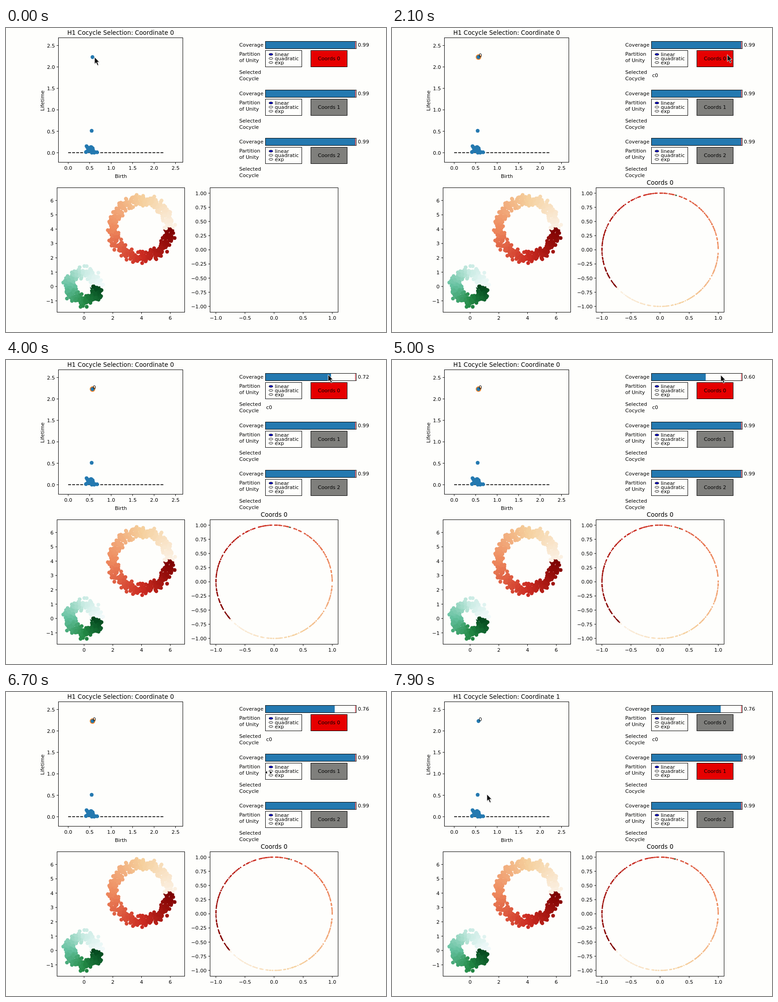
An HTML page for the animation above (8000 ms loop, 837x669 px).

```html
<!DOCTYPE html>
<html lang="en">
<head>
<meta charset="utf-8">
<title>Cocycle selection</title>
<style>
html, body { margin: 0; width: 100%; height: 100%; overflow: hidden; background: #fefefc; }
svg { display: block; width: 837px; height: 669px; }
text { font: 11.11px "DejaVu Sans", sans-serif; fill: #000; }
.title { font-size: 13.33px; }
.line { fill: none; stroke: #000; stroke-width: 1; }
</style>
</head>
<body>
<svg id="stage" viewBox="0 0 837 669"></svg>
<script>
const LOOP = 8000, FRAME = 100;
const BLUE = '#2479b0', PAPER = '#fefefc', RED = '#e60000', GREY = '#7f7f7c';
const TURN = 2 * Math.PI;
const stage = document.getElementById('stage');

function add(tag, attrs, parent = stage) {
  const el = document.createElementNS('http://www.w3.org/2000/svg', tag);
  for (const k in attrs) el.setAttribute(k, attrs[k]);
  parent.appendChild(el);
  return el;
}
function label(s, x, y, anchor = 'start', extra = {}) {
  const el = add('text', { x, y, 'text-anchor': anchor, ...extra });
  el.textContent = s;
  return el;
}
const dot = (cx, cy, r, fill, parent) => add('circle', { cx, cy, r, fill }, parent);
const box = (x, y, width, height, extra) => add('rect', { x, y, width, height, ...extra });
const show = (el, on) => el.setAttribute('visibility', on ? 'visible' : 'hidden');
const clamp = (v, lo, hi) => Math.max(lo, Math.min(hi, v));

// Seeded random numbers
let seed = 20;
function rand() {
  seed = (seed + 0x6D2B79F5) | 0;
  let n = Math.imul(seed ^ (seed >>> 15), 1 | seed);
  n = (n + Math.imul(n ^ (n >>> 7), 61 | n)) ^ n;
  return ((n ^ (n >>> 14)) >>> 0) / 4294967296;
}
const gauss = () => Math.sqrt(-2 * Math.log(1 - rand())) * Math.cos(TURN * rand());

// Colour ramps, light to dark
const WARM = ['fbf2e6', 'f5cf9c', 'ee8a5e', 'cc2c22', '7b0000'];
const COOL = ['f3fafb', 'c9ebe3', '63c09e', '248b46', '02451c'];
function ramp(stops, c) {
  const p = Math.min(c, .9999) * (stops.length - 1), i = Math.floor(p);
  const rgb = h => [0, 2, 4].map(k => parseInt(h.slice(k, k + 2), 16));
  const a = rgb(stops[i]), b = rgb(stops[i + 1]);
  return `rgb(${a.map((v, k) => Math.round(v + (b[k] - v) * (p - i)))})`;
}

// Axes frame; each scale is { from, step, count, at, gap, digits }
function axes(x, y, w, h, xs, ys) {
  const bottom = y + h;
  box(x, y, w, h, { class: 'line' });
  const each = (s, fn) => {
    for (let i = 0; i < s.count; i++)
      fn((s.from + i * s.step).toFixed(s.digits).replace('-', '\u2212'), s.at + i * s.gap);
  };
  each(xs, (s, p) => {
    add('path', { d: `M${p} ${bottom}v3.9`, class: 'line' });
    label(s, p, bottom + 16.6, 'middle');
  });
  each(ys, (s, p) => {
    add('path', { d: `M${x} ${p}h-3.9`, class: 'line' });
    label(s, x - 7.7, p + 4.2, 'end');
  });
}

// Persistence diagram
add('path', { d: 'M137 274.4H347', stroke: '#000', 'stroke-width': 1.67, 'stroke-dasharray': '6.17 2.67' });
const halo = dot(190.5, 64, 6, '#f58020');
dot(190.5, 64, 4.17, BLUE);
dot(188.7, 226.2, 4.17, BLUE);
for (let i = 0; i < 32; i++) {
  const y = 260 + 14.5 * rand();
  dot(clamp(187 + 5.5 * gauss() + .6 * (y - 267), 174, 200.6), y, 4.17, BLUE);
}
axes(115.5, 21.5, 274, 274,
  { from: 0, step: .5, count: 6, at: 137, gap: 47.3, digits: 1 },
  { from: 0, step: .5, count: 6, at: 274.5, gap: -47.2, digits: 1 });
label('Birth', 253, 329.5, 'middle');
label('Lifetime', 0, 0, 'middle', { transform: 'translate(83.5 160) rotate(-90)' });
const heading = label('', 252.5, 15.4, 'middle', { class: 'title' });
const tag = label('0', 191, 63.8);

// Two noisy rings; returns the turn (0 to 1) of every point
function ring(cx, cy, radius, count, limit, stops) {
  return Array.from({ length: count }, (_, i) => {
    const c = (i * .61803 + .02 * rand()) % 1;
    const r = 31.6 * (radius + clamp(gauss() * .19, -limit, limit));
    dot(cx + r * Math.cos(c * TURN), cy - r * Math.sin(c * TURN), 4.17, ramp(stops, c));
    return c;
  });
}
const turns = ring(298.5, 441.5, 2, 500, .4, WARM);
ring(171, 568.5, 1, 340, .44, COOL);
axes(112.5, 351.5, 281, 274,
  { from: 0, step: 2, count: 4, at: 172, gap: 63.3, digits: 0 },
  { from: -1, step: 1, count: 8, at: 600.4, gap: -31.55, digits: 0 });

// Circular coordinates
const circle = add('g', {});
const START = 221.7;
const inGap = a => Math.abs(a - 421) < 1.7 || Math.abs(a - 484.6) < 1.4;
const spots = turns
  .map(c => ({ c, angle: START + 360 * c + 2 * gauss() * c * (1 - c) }))
  .filter(s => !inGap(s.angle))
  .map(s => ({ ...s, el: dot(0, 0, 1.45, ramp(WARM, s.c + .07 * Math.sin(Math.PI * s.c)), circle) }));
const green = dot(0, 0, 1.6, '#1d7a50', circle);
axes(449.5, 351.5, 282, 274,
  { from: -1, step: .5, count: 5, at: 462.3, gap: 64.07, digits: 1 },
  { from: -1, step: .25, count: 9, at: 612.7, gap: -31.15, digits: 2 });
const circleTitle = label('Coords 0', 590.5, 344.5, 'middle', { class: 'title' });

function place(el, deg) {
  const a = deg * TURN / 360;
  el.setAttribute('cx', 590.5 + 128 * Math.cos(a));
  el.setAttribute('cy', 488.1 - 124.7 * Math.sin(a));
}

// Control rows
const rows = [0, 1, 2].map(i => {
  const y = Math.round(i * 106.6);
  box(571.5, y + 29.5, 200, 16, { fill: PAPER });
  const bar = box(571.5, y + 29.5, 198, 16, { fill: BLUE });
  add('path', { d: `M769.5 ${y + 29.5}v16`, stroke: '#e01020' });
  box(571.5, y + 29.5, 200, 16, { class: 'line' });
  label('Coverage', 567, y + 40.6, 'end');
  const value = label('0.99', 775, y + 40.6);
  ['Partition', 'of Unity', '', 'Selected', 'Cocycle'].forEach((s, k) =>
    label(s, 513.7, y + 61.2 + k * 13.4));
  box(571.5, y + 49.5, 80, 36, { class: 'line' });
  ['linear', 'quadratic', 'exp'].forEach((s, k) => {
    const cy = y + 58 + k * 9;
    add('ellipse', { cx: 583.5, cy, rx: 4.2, ry: 2.1, class: 'line', style: k ? '' : 'fill:#0000d0' });
    label(s, 592, cy + 4);
  });
  const button = box(671.5, y + 49.5, 80, 36, { stroke: '#000' });
  label('Coords ' + i, 711.5, y + 70.7, 'middle');
  return { bar, value, button };
});
const chosen = label('c0', 573, 107.7);

// Pointers
const arrow = add('g', {});
const shape = 'M0 0V15.2L3.5 12L6.2 18.3L8.8 17.1L6.2 11H10.6Z';
add('path', { d: shape, transform: 'translate(.8 1.4)', opacity: .18 }, arrow);
add('path', { d: shape, fill: '#111', stroke: '#fff', 'stroke-width': .9 }, arrow);
const resize = add('path', {
  d: 'M-9.5 0l6-3.6v7.2zM8 0l-6-3.6v7.2z', stroke: '#fff', 'stroke-width': .9
});

// Pointer moves: [start, end, x, y], resting in between
const MOVES = [
  [0, 500, 190, 61], [1300, 1700, 561, 445], [1800, 2150, 749, 36], [2300, 2800, 763, 32],
  [3000, 3100, 748, 32], [3500, 3600, 716, 32], [3900, 4200, 691, 33], [4700, 4800, 724, 33],
  [5400, 5900, 234, 111], [6000, 6300, 642, 186], [6400, 6700, 579, 177],
  [6800, 7200, 740, 165], [7500, 7900, 209, 225]
];
function pointer(t) {
  let x = 195, y = 64;
  for (const [start, end, tx, ty] of MOVES) {
    const u = clamp((t - start) / (end - start), 0, 1), e = u * u * (3 - 2 * u);
    x += (tx - x) * e;
    y += (ty - y) * e;
  }
  return [x, y];
}

// The slider follows the dragging pointer with a delay
const LAG = 400, DRAG = 2900, GRAB = 2800, DROP = 4900;
function coverage(t) {
  return t < DRAG ? .99 : (pointer(clamp(t - LAG, GRAB, DROP))[0] - 571.5) / 200;
}

let lastValue = null;
function setCoverage(v) {
  if (v === lastValue) return;
  lastValue = v;
  rows[0].bar.setAttribute('width', 200 * v);
  rows[0].value.textContent = v.toFixed(2);
  const shift = 110 * (v - .99) * (v - .7);
  spots.forEach(s => place(s.el, s.angle + shift));
  place(green, 73.9 - .8 * shift);
}

const SELECT = 1300, DRAWN = 1400, SWITCH = 7300;
function render(t) {
  const [x, y] = pointer(t);
  const wide = t >= 6700 && t < 6900;
  const hidden = t >= 800 && t < DRAWN;
  show(arrow, !hidden && !wide);
  show(resize, wide);
  (wide ? resize : arrow).setAttribute('transform', `translate(${x} ${y})`);

  setCoverage(coverage(t));
  const active = t >= SWITCH ? 1 : 0;
  heading.textContent = 'H1 Cocycle Selection: Coordinate ' + active;
  rows.forEach((r, i) => r.button.setAttribute('fill', i === active ? RED : GREY));
  show(halo, t >= SELECT && !active);
  show(tag, t >= SELECT);
  show(chosen, t >= SELECT);
  show(circle, t >= DRAWN);
  show(circleTitle, t >= DRAWN);
}

const begin = performance.now();
function tick() {
  const t = (performance.now() - begin) % LOOP;
  render(Math.floor(t / FRAME) * FRAME);
  requestAnimationFrame(tick);
}
tick();
</script>
</body>
</html>
```
